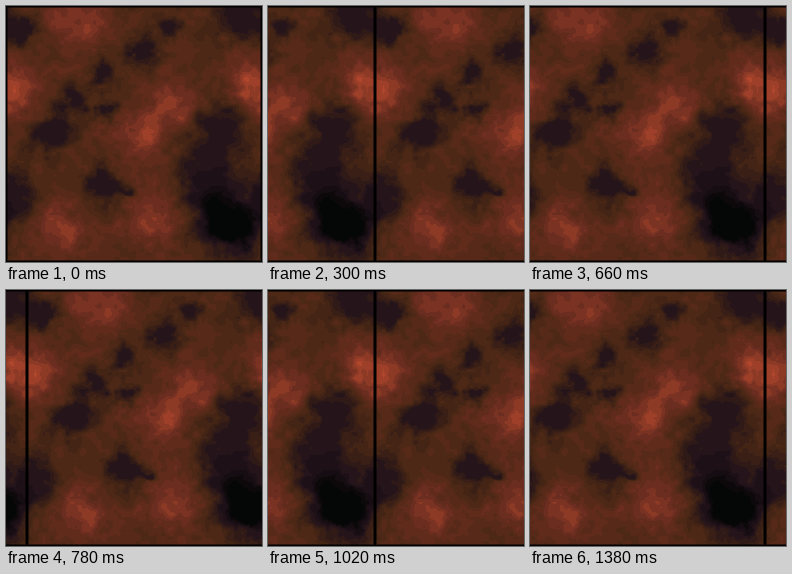
Write an HTML page with a canvas that moves like this. It is 256x256 px and loops after 1.44 s.

```html
<!DOCTYPE html>
<html lang="en">
<head>
<meta charset="utf-8">
<title>Drifting ember clouds</title>
<style>
html, body { margin: 0; width: 100%; height: 100%; overflow: hidden; background: #000; }
canvas { display: block; width: 256px; height: 256px; }
</style>
</head>
<body>
<canvas id="stage" width="256" height="256"></canvas>
<script>
const SIZE = 256, STEP_MS = 60, STEPS = 12;
const LEVELS = 16;
const BASE = 0.55, SHADOW = 0.24;
const EMBER = 0.3, SMOKE = 0.4, PIT = 0.25;

// Main cloud shapes: x, y, radius.
const embers = [
  [70, 16, 32], [12, 85, 24], [135, 130, 26], [168, 98, 25],
  [240, 76, 24], [52, 225, 28], [145, 215, 28]
];
const smoke = [
  [16, 24, 16], [138, 48, 14], [95, 68, 13], [66, 96, 12], [48, 125, 20],
  [100, 108, 8], [97, 180, 15], [118, 186, 8], [166, 18, 12], [232, 4, 24],
  [215, 125, 24], [200, 168, 28], [225, 215, 32], [8, 190, 18]
];
const pit = [[210, 207, 25], [228, 226, 22]];

const mix = (a, b, t) => a + (b - a) * t;
const ease = t => t * t * (3 - 2 * t);
const clamp = (v, low, high) => Math.max(low, Math.min(high, v));

const stops = ['#050606', '#23131a', '#482714', '#6d2d20', '#b0472c']
  .map(hex => [1, 3, 5].map(i => parseInt(hex.slice(i, i + 2), 16)));

function shade(level) {
  const at = level / (LEVELS - 1) * (stops.length - 1);
  const i = Math.min(Math.floor(at), stops.length - 2);
  return stops[i].map((c, k) => mix(c, stops[i + 1][k], at - i));
}

const palette = Array.from({ length: LEVELS }, (_, level) => shade(level));

function hash(x, y, seed) {
  let h = Math.imul(x, 374761393) + Math.imul(y, 668265263) + Math.imul(seed, 974634777);
  h = Math.imul(h ^ (h >>> 13), 1274126177);
  return ((h ^ (h >>> 16)) >>> 0) / 4294967296;
}

function noise(x, y, scale, seed) {
  const cells = SIZE / scale;
  const gx = Math.floor(x / scale), gy = Math.floor(y / scale);
  const tx = ease(x / scale - gx), ty = ease(y / scale - gy);
  const at = (i, j) => hash((gx + i) % cells, gy + j, seed);
  return mix(mix(at(0, 0), at(1, 0), tx), mix(at(0, 1), at(1, 1), tx), ty) * 2 - 1;
}

function fractal(x, y, seed) {
  let sum = 0;
  for (let scale = 16, gain = 1; scale >= 4; scale /= 2, gain *= 0.7) {
    sum += gain * noise(x, y, scale, seed + scale);
  }
  return sum;
}

function glow(blobs, x, y) {
  return blobs.reduce((sum, [bx, by, radius]) => {
    const far = Math.abs(x - bx);
    const dx = Math.min(far, SIZE - far), dy = y - by;
    return sum + Math.exp(-(dx * dx + dy * dy) / (radius * radius));
  }, 0);
}

function heat(x, y) {
  const wx = x + 5 * fractal(x, y, 1);
  const wy = y + 5 * fractal(x, y, 50);
  const cloud = BASE + EMBER * glow(embers, wx, wy) - SMOKE * glow(smoke, wx, wy)
    + 0.07 * fractal(x, y, 100);
  return Math.max(SHADOW, cloud) - PIT * glow(pit, wx, wy);
}

function makeTile() {
  const tile = document.createElement('canvas');
  tile.width = tile.height = SIZE;
  const g = tile.getContext('2d');
  const image = g.createImageData(SIZE, SIZE);
  for (let y = 0; y < SIZE; y++) {
    for (let x = 0; x < SIZE; x++) {
      const level = Math.round(clamp(heat(x, y), 0, 1) * (LEVELS - 1));
      image.data.set([...palette[level], 255], (y * SIZE + x) * 4);
    }
  }
  g.putImageData(image, 0, 0);
  frame(g, 3, 'rgba(0, 0, 0, 0.5)');
  frame(g, 1, '#000');
  return tile;
}

function frame(g, width, color) {
  g.lineWidth = width;
  g.strokeStyle = color;
  g.strokeRect(0.5, 0.5, SIZE - 1, SIZE - 1);
}

const ctx = document.getElementById('stage').getContext('2d');
const tile = makeTile();
const start = performance.now();

function draw(now) {
  const step = Math.floor(Math.max(0, now - start) / STEP_MS) % STEPS;
  const shift = Math.round(step * SIZE / STEPS);
  ctx.drawImage(tile, shift, 0);
  ctx.drawImage(tile, shift - SIZE, 0);
  requestAnimationFrame(draw);
}
draw(start);
</script>
</body>
</html>
```
